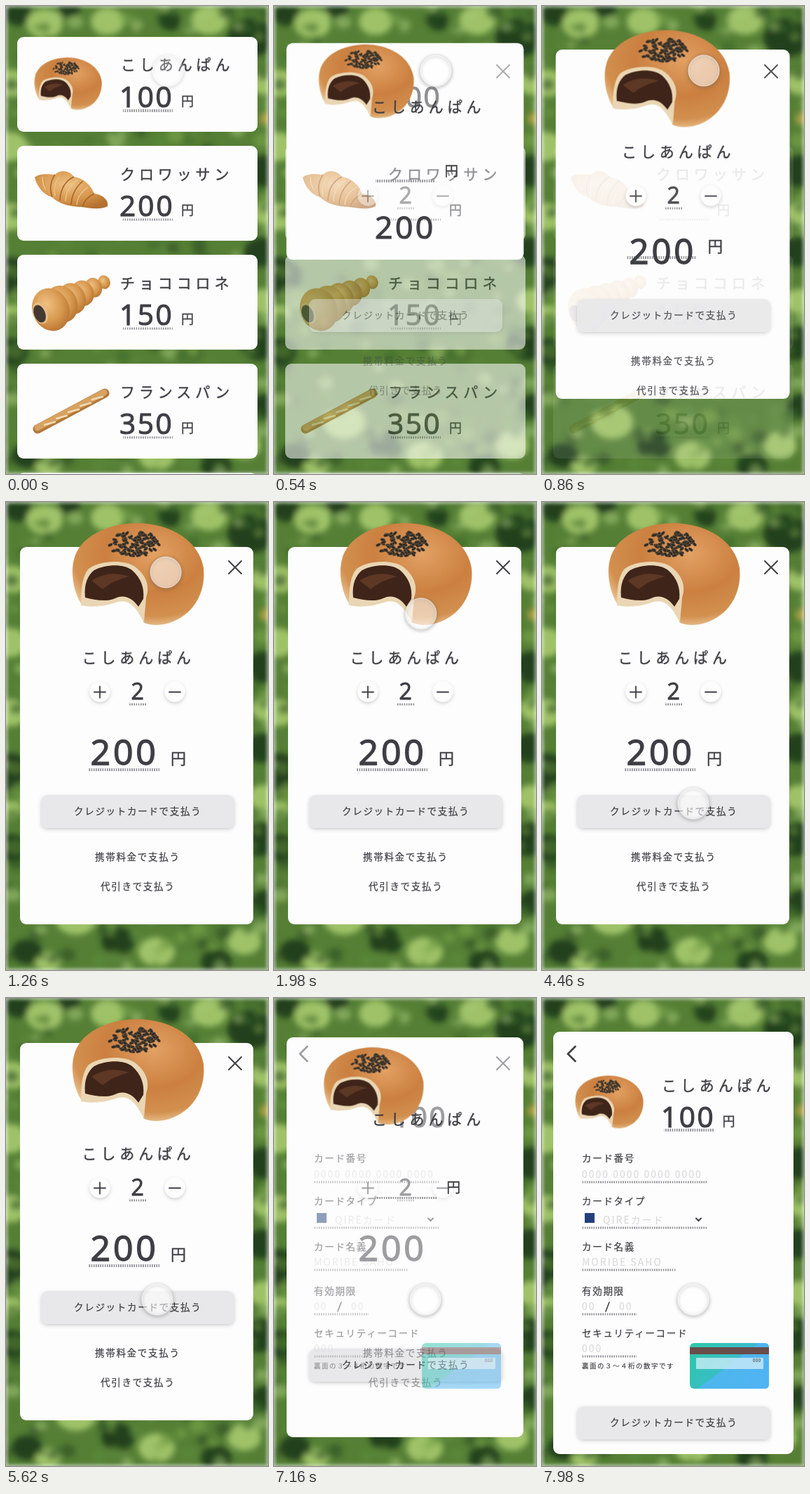
Animation of 374 by 666 pixels, one loop 8000 ms. Source, as an HTML page:

```html
<!DOCTYPE html>
<html lang="ja">
<head>
<meta charset="utf-8">
<title>Bakery checkout</title>
<style>
html, body { margin: 0; height: 100%; overflow: hidden; background: #fff; }
svg { display: block; width: 100vw; height: 100vh; }
text {
  font-family: "Noto Sans CJK JP", "Noto Sans CJK", sans-serif; font-weight: 500; white-space: pre;
  fill: #3e3e44; stroke: #3e3e44; stroke-width: .018em;
}
.num { font-family: "Open Sans", "Noto Sans", sans-serif; font-weight: 400; stroke-width: .028em; }
.hint { font-weight: 300; fill: #d6d6d8; stroke: none; }
.line { fill: none; stroke: #3e3e44; stroke-linecap: round; }

/* Three states: product list, product detail, card form */
.move, .clip, .fade { animation: move 8s ease-in-out infinite; }
.clip { animation-name: clip; }
.fade { animation-name: fade; }
@keyframes move {
  0%, 1% { transform: var(--a); }
  13.5%, 83.25% { transform: var(--b); }
  95.75%, 100% { transform: var(--c); }
}
@keyframes clip {
  0%, 1% { clip-path: var(--a); }
  13.5%, 83.25% { clip-path: var(--b); }
  95.75%, 100% { clip-path: var(--c); }
}
@keyframes fade {
  0%, 1% { opacity: var(--in-list); }
  13.5%, 83.25% { opacity: var(--in-detail); }
  95.75%, 100% { opacity: var(--in-form); }
}
.fade { --in-list: 0; --in-detail: 0; --in-form: 0; }
.list { --in-list: 1; }
.detail { --in-detail: 1; }
.form { --in-form: 1; }

#panel {
  --a: inset(44px 15px 487px 16px round 9px);
  --b: inset(64px 21px 65px 20px round 9px);
  --c: inset(48px 15px 17px 16px round 9px);
}
#rule {
  --a: inset(147.5px 136px 515.5px 167px);
  --b: inset(379.5px 155px 283.5px 117px);
  --c: inset(186.5px 129px 476.5px 174px);
}
#bun {
  --a: translate(-8.2px, 57.9px) scale(.513);
  --b: translate(0px, 0px) scale(1);
  --c: translate(-1.7px, 94.9px) scale(.518);
}
#name { --a: translate(164px, 83px); --b: translate(108.5px, 221px); --c: translate(171px, 124px); }
#yen {
  --a: translate(259px, 135px) scale(.82);
  --b: translate(246px, 364.5px) scale(1);
  --c: translate(266.5px, 175px) scale(.82);
}
#total {
  --a: translate(162px, 299px) scale(.81);
  --b: translate(120.5px, 374px) scale(1);
  --c: translate(120.5px, 374px) scale(1);
}
#pay { --a: translate(0px, 0px); --b: translate(0px, 0px); --c: translate(0px, 164px); }

#touch {
  offset-path: path("M231 92Q219 125 210 158C190 230 176 310 193 361Q203 398 216 429");
  offset-rotate: 0deg;
  animation: glide 8s ease-in-out infinite, appear 8s linear infinite;
}
@keyframes glide {
  0%, 10.75% { offset-distance: 0%; }
  55.75%, 100% { offset-distance: 100%; }
}
@keyframes appear {
  0% { opacity: .5; }
  4%, 100% { opacity: 1; }
}
</style>
</head>
<body>
<svg id="stage" viewBox="0 0 374 666" preserveAspectRatio="none"></svg>
<script>
const PAPER = '#fdfdfd';

let seed = 7;
const random = () => (seed = seed * 16807 % 2147483647) / 2147483647;
const between = (low, high) => low + (high - low) * random();
const repeat = (count, draw) => Array.from({ length: count }, (_, i) => draw(i)).join('');

// y is the optical middle of the line
const text = (x, y, string, size = 13.5, gap = 1.7, cls = '') =>
  `<text x="${x}" y="${y + size * .38}" font-size="${size}" letter-spacing="${gap}" class="${cls}">${string}</text>`;
// y is the baseline
const number = (x, y, value, size = 40.5, gap = 2.6) =>
  `<text x="${x}" y="${y}" font-size="${size}" letter-spacing="${gap}" class="num">${value}</text>`;
const dots = (x1, x2, y) =>
  `<rect x="${x1}" y="${y - 1.5}" width="${x2 - x1}" height="3" fill="url(#ticks)"/>`;
const line = (d, width) => `<path class="line" d="${d}" stroke-width="${width}"/>`;
const blob = (x, y, r, color) =>
  `<ellipse cx="${x}" cy="${y}" rx="${r}" ry="${r * .8}" fill="${color}"/>`;

const defs = `<defs>
  <pattern id="ticks" width="3.2" height="666" patternUnits="userSpaceOnUse">
    <rect width="1.6" height="666" fill="#8c8c92"/></pattern>
  <filter id="leafBlur" x="-10%" y="-10%" width="120%" height="120%"><feGaussianBlur stdDeviation="4"/></filter>
  <filter id="edgeBlur" x="-20%" y="-20%" width="140%" height="140%"><feGaussianBlur stdDeviation="2"/></filter>
  <filter id="soft" x="-50%" y="-50%" width="200%" height="200%">
    <feDropShadow dx="0" dy="2" stdDeviation="2.5" flood-color="#555" flood-opacity=".28"/></filter>
  <radialGradient id="crust" cx=".62" cy=".3" r=".75">
    <stop stop-color="#e2a163"/><stop offset=".5" stop-color="#cb8040"/>
    <stop offset=".82" stop-color="#d2904f"/><stop offset="1" stop-color="#efcda0"/></radialGradient>
  <radialGradient id="roll" cx=".45" cy=".35" r=".7">
    <stop stop-color="#efc185"/><stop offset=".6" stop-color="#d6964c"/><stop offset="1" stop-color="#b37030"/></radialGradient>
  <linearGradient id="plastic" x2="1" y2=".4">
    <stop stop-color="#2cc8a6"/><stop offset="1" stop-color="#45b4e0"/></linearGradient>
</defs>`;

const darkLeaves = [[18, 12, 20], [90, 4, 16], [350, 45, 34], [6, 385, 34], [8, 492, 24], [368, 235, 28],
  [366, 350, 26], [362, 480, 30], [372, 570, 22], [30, 640, 22], [160, 625, 24], [300, 655, 22], [235, 22, 16]];
const lightLeaves = [[55, 25, 26], [145, 22, 24], [290, 20, 26], [8, 110, 24], [5, 200, 26], [6, 300, 24], [6, 440, 18],
  [100, 592, 30], [215, 640, 26], [340, 625, 24], [368, 110, 20], [370, 295, 20], [368, 420, 22], [60, 655, 18]];

const background = `<rect width="374" height="666" fill="#557f35"/>
  <g filter="url(#leafBlur)">
    ${darkLeaves.map(([x, y, r]) => blob(x, y, r, '#213f1c')).join('')}
    ${lightLeaves.map(([x, y, r]) => blob(x, y, r, '#9fc268')).join('')}
    <g opacity=".55">${repeat(330, () => blob(between(-5, 379), between(-5, 671), between(5, 13),
      ['#7fa94e', '#3c6627', '#a5c677', '#274a1e', '#5d8b39'][Math.floor(random() * 5)]))}</g>
    ${blob(372, 160, 10, '#b3a24a')}
  </g>
  <rect width="374" height="666" fill="none" stroke="#fff" stroke-width="4" opacity=".6" filter="url(#edgeBlur)"/>`;

const bun = `
  <path fill="url(#crust)" d="M108 146C96 128 92 100 97 82C104 52 140 31 186 30C236 30 276 56 282 94C286 132 264 166 226 174Q206 177 196 171L194 152L160 134Z"/>
  <path fill="#ead6b4" d="M107 147C107 128 108 106 118 95C130 85 166 80 184 92C200 104 206 120 200 136L197 171C190 160 186 150 176 144C164 136 150 148 134 148Q118 150 107 147Z"/>
  <path fill="#3f2419" d="M113 136C111 116 117 104 126 97C142 89 168 87 181 98C192 108 198 122 196 138L189 149C180 136 168 131 156 137C142 143 126 139 113 136Z"/>
  <path fill="#5d3825" d="M122 112Q146 96 176 106Q152 112 138 124Z"/>
  ${repeat(95, () => {
    const angle = between(0, 6.28), radius = Math.sqrt(random());
    const x = 182 + Math.cos(angle) * radius * 36, y = 59 + Math.sin(angle) * radius * 18;
    return `<ellipse rx="3.6" ry="2" fill="#2d2a26" stroke="#8a6a48" stroke-width=".5" transform="translate(${x} ${y}) rotate(${between(-50, 60)})"/>`;
  })}`;

const croissant = `
  <path fill="url(#roll)" d="M41 244C50 237 62 240 70 240C78 232 90 234 97 243C112 245 122 257 126 267C137 268 147 276 145 285C136 290 120 288 108 286C92 286 74 281 66 272C52 268 44 256 41 244Z"/>
  <g fill="none" stroke="#a8652a" stroke-width="1.6">
    <path d="M70 240Q60 254 66 272M97 243Q78 252 77 277M110 249Q94 262 93 283M126 267Q112 274 109 286"/>
    <path stroke="#eccb94" stroke-width="1.2" d="M76 243Q66 256 70 271M102 248Q85 259 85 278M117 258Q102 268 101 283M52 243Q52 254 57 262"/>
  </g>`;

const cornet = repeat(6, i => {
  const k = i / 5, r = 10 + 21 * k;
  return `<ellipse rx="${r * .85}" ry="${r}" fill="url(#roll)" transform="translate(${140 - 76 * k} ${393 + 39 * k}) rotate(-22)"/>`;
}) + `<ellipse rx="10" ry="16" fill="#e4bd86" transform="translate(49 437) rotate(-22)"/>
  <ellipse rx="8" ry="13" fill="#453833" transform="translate(48 438) rotate(-22)"/>`;

const baguette = `<g stroke-linecap="round">
  <path d="M45 602L141 551" stroke="#b3783a" stroke-width="13"/>
  <path d="M45 600L140 550" stroke="#d8a261" stroke-width="9"/>
  ${repeat(5, i => `<path d="M${55 + i * 17} ${596 - i * 9}l15 -4" stroke="#f0dcb4" stroke-width="2.4"/>`)}</g>`;

const card = ([name, price, picture], i) => {
  const top = 199 + i * 155;
  return `<rect x="16" y="${top}" width="343" height="135" rx="9" fill="${PAPER}"/>${picture}
    ${text(163, top + 40, name, 21, 5.9)}${price ? number(162, top + 100, price) : ''}
    ${text(250, top + 91, '円', 18)}${dots(167, 238, top + 105)}`;
};
const list = `<g class="fade list">
  ${[['クロワッサン', '', croissant], ['チョココロネ', 150, cornet], ['フランスパン', 350, baguette]].map(card).join('')}
  <rect x="16" y="664.5" width="343" height="20" rx="9" fill="${PAPER}"/>
  ${number(162, 144, 100)}</g>`;

const roundButton = (x, d) =>
  `<circle cx="${x}" cy="270" r="14.5" fill="${PAPER}" filter="url(#soft)"/>${line(d, 1.8)}`;
const detail = `<g class="fade detail">
  ${line('M318 84L336 102M336 84L318 102', 2)}
  ${roundButton(134, 'M126 270.5H142M134 262.5V278.5')}${roundButton(241, 'M233 270.5H249')}
  ${number(178.5, 281, 2, 32, 0)}${dots(175, 201, 288)}
  ${text(127, 505, '携帯料金で支払う')}${text(135, 547, '代引きで支払う')}</g>`;

const field = (y, label, value, x2, ruleY, x = 57) =>
  text(57, y, label) + text(x, ruleY - 11.5, value, 14, 2, 'hint') + dots(57, x2, ruleY);
const form = `<g class="fade form">
  ${line('M47.5 69L37 79.5L47.5 90', 2.6)}
  ${number(170, 184, 100)}
  ${field(228, 'カード番号', '0000 0000 0000 0000', 235, 262)}
  ${field(289, 'カードタイプ', 'QIREカード', 235, 327, 87)}
  <rect x="61" y="306" width="14" height="14" fill="#24407c"/>
  ${line('M220 313.5L223.5 317L227 313.5', 2)}
  ${field(354, 'カード名義', 'MORIBE SAHO', 191, 387)}
  ${field(417, '有効期限', '00', 135, 450)}${text(110, 438.5, '00', 14, 2, 'hint')}${line('M91 446L96 433', 1.6)}
  ${field(477, 'セキュリティーコード', '000', 135, 510)}
  ${text(57, 523, '裏面の３〜４桁の数字です', 9.5, 1.5)}
  <rect x="211" y="491" width="113" height="65" rx="6" fill="url(#plastic)"/>
  <path d="M222 556L310 491H318Q324 491 324 497V550Q324 556 318 556Z" fill="#55b4fa" opacity=".75"/>
  <rect x="211" y="497" width="113" height="10" fill="#694c4b"/>
  <rect x="220" y="512" width="96" height="16" fill="#d3effa" opacity=".75"/>
  ${text(301, 516, '000', 6, .5)}</g>`;

const payButton = `<g class="fade detail form"><g id="pay" class="move">
  <rect x="50" y="417" width="276" height="47" rx="9" fill="#e8e8ea" filter="url(#soft)"/>
  ${text(97, 440, 'クレジットカードで支払う')}</g></g>`;

const sheet = (id, fill) => `<rect id="${id}" class="clip" width="374" height="666" fill="${fill}"/>`;

document.getElementById('stage').innerHTML = `${defs}${background}
  ${sheet('panel', PAPER)}${list}${payButton}${detail}${form}
  <g id="bun" class="move">${bun}</g>
  ${sheet('rule', 'url(#ticks)')}
  <g class="fade list detail"><g id="total" class="move">${number(0, 0, 200, 50, 3.8)}</g></g>
  <g id="yen" class="move">${text(-11, 0, '円', 22, 0)}</g>
  <g id="name" class="move">${text(0, 0, 'こしあんぱん', 21, 5.9)}</g>
  <g id="touch">
    <circle r="22" cy="1.5" fill="none" stroke="#444" stroke-opacity=".4" stroke-width="3" filter="url(#edgeBlur)"/>
    <circle r="22" fill="#fff" fill-opacity=".55" stroke="#fff" stroke-opacity=".7"/>
  </g>`;

// The picture holds in a steady beat of 20, 100 and 20 ms
const LOOP = 8000, BEAT = 140;
const heldTime = time => {
  const phase = time % BEAT;
  return time - phase + (phase < 20 ? 0 : phase < 120 ? 20 : 120);
};

const animations = document.getAnimations();
animations.forEach(animation => animation.pause());
const start = performance.now();
function render() {
  const time = heldTime(Math.round(performance.now() - start) % LOOP);
  animations.forEach(animation => { animation.currentTime = time; });
  requestAnimationFrame(render);
}
render();
</script>
</body>
</html>
```
